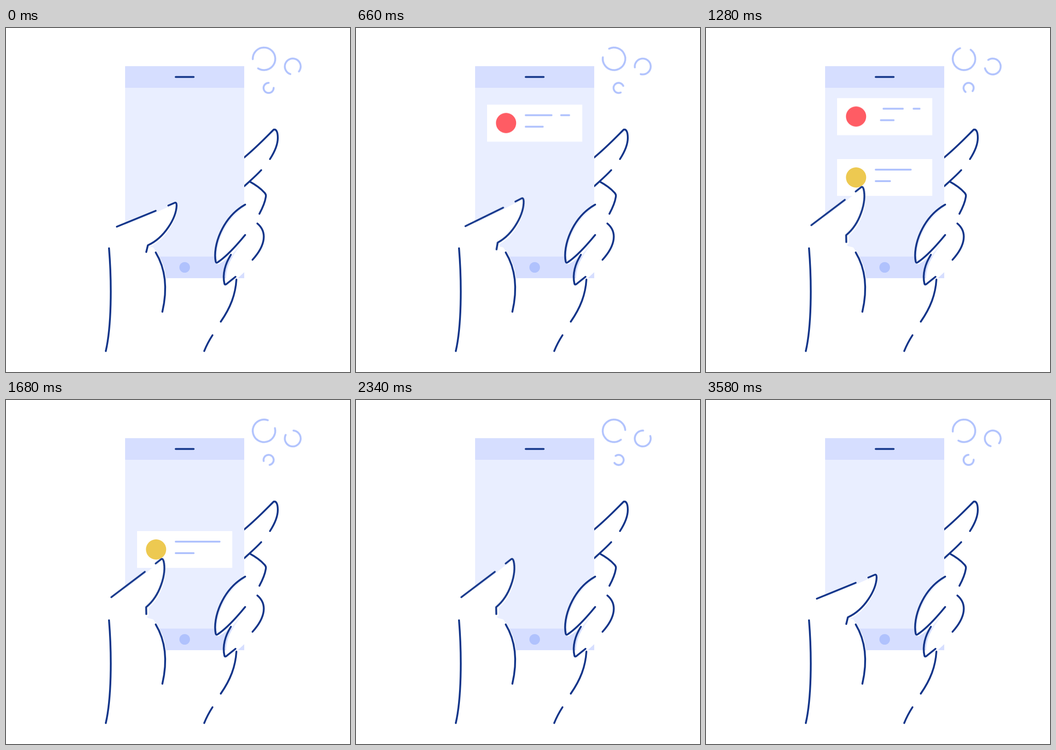
Recreate the animation shown at these times as an HTML page. Size 748 by 748 pixels, loop 3600 ms.

```html
<!DOCTYPE html>
<html lang="en">
<head>
<meta charset="utf-8">
<title>Phone notifications</title>
<style>
  html, body { margin: 0; width: 100%; height: 100%; overflow: hidden; background: #fff; }
  svg { display: block; width: 100%; height: 100%; }

  .ink, .ring, .text path { fill: none; stroke-width: 4; stroke-linecap: round; stroke-linejoin: round; }
  .ink { stroke: #14368a; }
  .ring, .text path { stroke: #b0c2fd; }
  .skin { fill: #fff; }

  .ring, .thumb, .card, .text path { animation: 3.6s cubic-bezier(.37, 0, .63, 1) infinite both; }

  .ring {
    transform-box: fill-box;
    transform-origin: center;
    animation-name: spin;
    animation-timing-function: linear;
  }
  @keyframes spin {
    from { transform: rotate(var(--a)); }
    to { transform: rotate(calc(var(--a) + 360deg)); }
  }

  .thumb { transform-origin: 222.6px 476px; animation-name: swipe; }
  @keyframes swipe {
    0%, 21.1%, 99.4%, 100% { transform: rotate(0deg); }
    11.1%, 13.1%, 31.9%, 88.1% { transform: rotate(-14.9deg); }
  }

  .first { animation-name: move1, fade1; }
  .second { animation-name: move2, fade2; }
  @keyframes move1 {
    0%, 6.67% { transform: translateY(285px); }
    21.53%, 35.83% { transform: translateY(152.5px); }
    45.56%, 100% { transform: translateY(20px); }
  }
  @keyframes fade1 {
    0%, 6.67%, 45%, 100% { opacity: 0; }
    12.2%, 38.9% { opacity: 1; }
  }
  @keyframes move2 {
    0%, 21.1% { transform: translateY(417px); }
    33.3%, 50% { transform: translateY(285px); }
    61.7%, 100% { transform: translateY(152.5px); }
  }
  @keyframes fade2 {
    0%, 21.1%, 61.7%, 100% { opacity: 0; }
    26.7%, 54.4% { opacity: 1; }
  }

  /* Each text line grows from its left end, then retracts to its right end. */
  .text path { stroke-dasharray: 1 3; }
  .first .text path { animation-name: trim1; }
  .second .text path { animation-name: trim2; }
  @keyframes trim1 {
    0%, 6.4% { stroke-dashoffset: 1.01; }
    20.3%, 31.6% { stroke-dashoffset: 0; }
    42.7%, 100% { stroke-dashoffset: -1.01; }
  }
  @keyframes trim2 {
    0%, 25.8% { stroke-dashoffset: 1.01; }
    39.7%, 46.9% { stroke-dashoffset: 0; }
    58.1%, 100% { stroke-dashoffset: -1.01; }
  }
</style>
</head>
<body>
<svg viewBox="0 0 748 748">
  <!-- bubbles -->
  <circle class="ring" style="--a:178deg" cx="561" cy="67" r="24.5" pathLength="360" stroke-dasharray="304 56"/>
  <circle class="ring" style="--a:107deg" cx="623.5" cy="83.7" r="17.3" pathLength="360" stroke-dasharray="292 68"/>
  <circle class="ring" style="--a:359deg" cx="571" cy="130.3" r="11" pathLength="360" stroke-dasharray="272 88"/>

  <!-- fingers behind the phone -->
  <g class="ink">
    <path d="M518 281.500C545 259 565 238 582 221C588 219 591 227 591 239C591 255 583 271 574 285"/>
    <path d="M518 344C530 333 543 322 555 309"/>
    <path d="M530 334C541 340 555 350 562 358Q566 362 565 367C563 380 558 391 551 404"/>
    <path d="M546.500 425C568 443 565 472 536 504"/>
  </g>

  <!-- phone -->
  <path fill="#e9eeff" d="M259 83H518V544H259Z"/>
  <path fill="#d6deff" d="M259 497H518V544H259Z"/>
  <circle fill="#b0c2fd" cx="388.500" cy="520.500" r="11.500"/>

  <g class="card first">
    <path fill="#fff" d="M285 0H492V80.500H285Z"/>
    <circle fill="#ff5c64" cx="326.300" cy="40" r="22"/>
    <g class="text">
      <path pathLength="1" d="M369 23H428"/>
      <path pathLength="1" d="M446 23H464.500"/>
      <path pathLength="1" d="M369 48H408"/>
    </g>
  </g>
  <g class="card second">
    <path fill="#fff" d="M285 0H492V80H285Z"/>
    <circle fill="#edc951" cx="326.300" cy="40" r="22"/>
    <g class="text">
      <path pathLength="1" d="M369 23H464.500"/>
      <path pathLength="1" d="M369 48H408"/>
    </g>
  </g>

  <path fill="#d6deff" d="M259 83H518V130H259Z"/>
  <path class="ink" d="M369 106.500H408"/>

  <!-- fingers in front -->
  <path class="skin" d="M494 496C482 513 475 540 480 561L504 544L518 531L524 450Z"/>
  <path class="skin" d="M524 386C474 415 453 478 459 512Q461 515 465 512C480 503 490 494 495 488L524 455Z"/>
  <g class="ink">
    <path d="M520 384C470 412 449 475 456 508Q457 512 461 509C482 495 502 472 520 450"/>
    <path d="M489 493C477 512 470 535 475 556Q476 559 479 557L499 541"/>
    <path d="M501 547C499 580 488 608 467 638.500"/>
    <path d="M449 668Q438 685 431 702.500"/>
  </g>

  <!-- palm and thumb -->
  <path class="skin" d="M250 445L300 455L308 474L320 477L328 489C340 505 346 525 348 546H250Z"/>
  <g class="thumb">
    <path class="skin" d="M238 437L326 401L353 389L368 381L373 384C374 413 349 460 314 475L309 492L230 500Z"/>
    <path class="ink" d="M241 432L325.500 397.500"/>
    <path class="ink" d="M353 386L367 380Q371 378.500 371 386C370 413 345 456 308.500 472.500L305 487"/>
  </g>
  <g class="ink">
    <path d="M224 479C230.500 560 229 650 217 702.500"/>
    <path d="M325.500 488C346 522 352 565 340 617"/>
  </g>
</svg>
</body>
</html>
```
